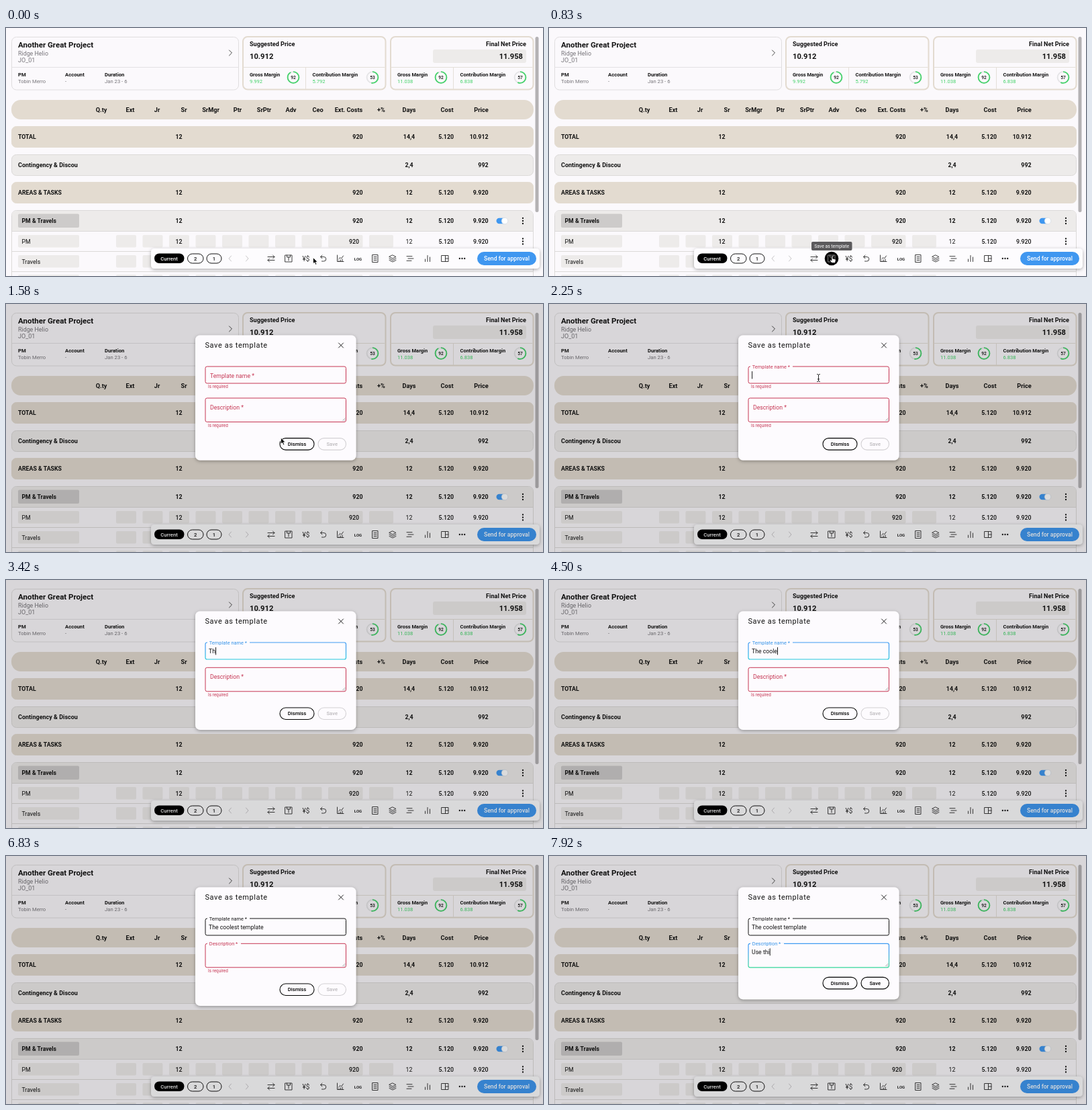
An HTML page for the animation above (8000 ms loop, 800x369 px).

```html
<!DOCTYPE html>
<html lang="en">
<head>
<meta charset="utf-8">
<title>Save as template</title>
<style>
html, body { margin: 0; width: 100%; height: 100%; overflow: hidden; background: #fbf9fc; }
svg { display: block; width: 100vw; height: 100vh; }
text { font-family: Roboto, "Open Sans", sans-serif; white-space: pre; }
</style>
</head>
<body>
<svg id="stage" viewBox="0 0 800 369"></svg>
<script>
const INK = '#131313', BG = '#fbf9fc', SAND = '#e3dbd0', PALE = '#edebea', GREEN = '#45d36b';
const RED = '#c63653', BLUE = '#3593e8', PANEL = '#fdfbfe';
const LOOP = 8000;

// Markup helpers; text is placed by its vertical centre.
const text = (x, y, s, size, weight = 400, fill = INK, anchor = 'start', more = '') =>
  `<text x="${x}" y="${y + size * 0.36}" font-size="${size}" font-weight="${weight}" fill="${fill}" text-anchor="${anchor}" ${more}>${s.replace('&', '&amp;')}</text>`;
const box = (x, y, w, h, r, fill, stroke = 'none', sw = 1, more = '') =>
  `<rect x="${x}" y="${y}" width="${w}" height="${h}" rx="${r}" fill="${fill}" stroke="${stroke}" stroke-width="${sw}" ${more}/>`;
const path = (d, stroke = INK, w = 1, more = '') =>
  `<path d="${d}" fill="none" stroke="${stroke}" stroke-width="${w}" stroke-linecap="round" stroke-linejoin="round" ${more}/>`;
const dots = (x, y, dx, dy) =>
  [-1, 0, 1].map(k => `<circle cx="${x + k * dx}" cy="${y + k * dy}" r="1.15" fill="${INK}"/>`).join('');

function donut(x, pct) {
  const len = 2 * Math.PI * 8.4;
  return `<g transform="translate(${x} 73.5)" fill="none" stroke-width="1.8">
    <circle r="8.4" stroke="#e4e4e6"/>
    <circle r="8.4" stroke="${GREEN}" stroke-dasharray="${len * pct / 100} ${len}" transform="rotate(-90)"/>
    </g>` + text(x, 73.7, '' + pct, 6.6, 500, INK, 'middle');
}

function priceCard(x, gross, grossPct, contrib, contribPct) {
  return box(x + 1, 13, 212.5, 78.5, 7, BG, SAND, 2) +
    path(`M${x + 2} 58.5H${x + 212}M${x + 94.5} 58.5V90.5`, '#e4dfd9') +
    text(x + 11, 69.3, 'Gross Margin', 7.5, 700) + text(x + 11, 79.5, gross, 7.6, 400, GREEN) +
    text(x + 104.5, 69.3, 'Contribution Margin', 7.5, 700) + text(x + 104.5, 79.5, contrib, 7.6, 400, GREEN) +
    donut(x + 76, grossPct) + donut(x + 194, contribPct);
}

function header() {
  let s = box(8.5, 13.5, 338, 78.5, 7, BG, '#e0dedf') + path('M9 58.5H346', '#e4e2e4') +
    text(18, 25.2, 'Another Great Project', 11.5, 700) +
    text(18, 37.3, 'Ridge Helio', 8.9, 400, '#77757a') + text(18, 48, 'JO_01', 9, 400, '#77757a') +
    path('M332.5 33L336.5 37L332.5 41', '#444');
  [[18, 'PM', 'Tobin Merro'], [88, 'Account', '-'], [147, 'Duration', 'Jan 23 - 6']].forEach(([x, a, b]) => {
    s += text(x, 69.5, a, 7.7, 700) + text(x, 79.5, b, 7.7, 400, '#77757a');
  });
  return s + priceCard(352, '9.992', 92, '5.792', 53) + priceCard(572, '11.038', 92, '6.838', 57) +
    text(363, 24, 'Suggested Price', 9.1, 700) + text(363, 42, '10.912', 11.2, 700) +
    text(775, 24, 'Final Net Price', 9.1, 700, INK, 'end') +
    box(636, 32, 139, 20, 3, PALE) + text(770, 42, '11.958', 11.2, 700, INK, 'end');
}

// Values in the order: senior days, external costs, days, cost, price.
function values(y, list, weight = 700, inset = 0) {
  const cols = [[262.5, 'end'], [531.5 - inset, 'end'], [600.5, 'middle'], [667, 'end'], [718.5, 'end']];
  return list.map((v, i) => v && text(cols[i][0], y, v, 8.8, i == 2 ? weight : Math.max(weight, 500), INK, cols[i][1])).join('');
}

function fieldsRow(y) {
  let s = box(18, y, 91, 18.5, 2, PALE);
  for (let i = 0; i < 8; i++) s += box(164 + i * 39.5, y, 30, 18.5, 2, PALE);
  return s + box(480, y, 51.5, 18.5, 2, PALE) + box(541, y, 36, 18.5, 2, PALE);
}

function table() {
  let s = box(8, 107, 778, 29, 14, SAND);
  const heads = [['Q.ty', 142], ['Ext', 185], ['Jr', 225], ['Sr', 265], ['SrMgr', 305], ['Ptr', 345], ['SrPtr', 384.5],
    ['Adv', 424.5], ['Ceo', 464.5], ['Ext. Costs', 510.5], ['+%', 559], ['Days', 600.5], ['Cost', 657], ['Price', 708]];
  heads.forEach(([h, x]) => { s += text(x, 121.5, h, 9.2, 700, INK, 'middle'); });
  const bands = [[146, 'TOTAL', SAND, ['12', '920', '14,4', '5.120', '10.912']],
    [188, 'Contingency & Discou', PALE, ['', '', '2,4', '', '992']],
    [229, 'AREAS & TASKS', SAND, ['12', '920', '12', '5.120', '9.920']]];
  bands.forEach(([y, name, fill, vals]) => {
    s += box(8.5, y + 0.5, 777, 31, 7, fill, fill == PALE ? '#dcdad9' : fill) +
      text(18, y + 15.5, name, fill == PALE ? 9 : 8.8, 700) + values(y + 15.5, vals);
  });
  s += box(8.5, 271.5, 777, 130, 7, BG, '#dcdad9') +
    `<path d="M9 302V278.500Q9 272 16 272H778Q785 272 785 278.500V302Z" fill="${PALE}"/>` +
    path('M9 302.500H785M9 332.500H785M9 362.500H785', '#dcdad9') +
    box(18, 276.5, 91, 20.5, 2, '#cdcbca') + text(23.5, 287, 'PM & Travels', 8.7, 700) +
    values(287, ['12', '920', '12', '5.120', '9.920']) +
    box(730.5, 282.8, 16.5, 8.4, 4.2, '#3f97f0') + '<circle cx="743" cy="287" r="4.800" fill="#fff" stroke="#cbd3dd" stroke-width=".6"/>' +
    dots(770, 287, 0, 4) + dots(770, 317.5, 0, 4);
  [308, 338, 367].forEach(y => { s += fieldsRow(y); });
  return s + text(23.5, 317.5, 'PM', 8.7) + text(23.5, 347.5, 'Travels', 8.7) +
    values(317.5, ['12', '920', '12', '5.120', '9.920'], 400, 5.5) +
    box(788.5, 13, 5, 261, 2.5, '#b4b2b4');
}

const TEMPLATE_ICON = 'M-5-5H5V5H-5ZM-2.500-5V-2H2.500V-5M0-2V3';

function toolbar() {
  const icons = [
    [334, 'M1.500-4L-2 0L1.500 4', '#c4c2c5'], [359, 'M-1.500-4L2 0L-1.500 4', '#c4c2c5'],
    [395, 'M-5-2.500H5M2.500-5L5-2.500L2.500 0M5 2.500H-5M-2.500 0L-5 2.500L-2.500 5'],
    [472.5, 'M-3.500-2.500H1A3.200 3.200 0 0 1 1 4H-2M-1.500-5L-4-2.500L-1.500 0'],
    [498, 'M-4.500-5V4.500H5M-2.500 1L0-1.500L1.500 0L4.500-4M-2 4V3M.5 4V2M3 4V1'],
    [550, 'M-4-5.500H4V5.500H-4ZM-2-2.500H2M-2 0H2M-2 2.500H2'],
    [576, 'M0-5L5-2.500L0 0L-5-2.500ZM-5 0L0 2.500L5 0M-5 2.500L0 5L5 2.500'],
    [602, 'M-5-3.300H3M-3 0H5M-5 3.300H2'],
    [628, 'M-3.500 4.500V1M0 4.500V-4.500M3.500 4.500V-2'],
    [654, 'M-5-4.500H5V4.500H-5ZM.5-4.500V4.500M.5 0H5']];
  let s = box(216, 328, 579, 30, 5, '#fdfcfe', 'none', 1, 'filter="url(#soft)"') +
    box(221, 335.5, 44.5, 14.5, 7.2, '#000') + text(243, 342.8, 'Current', 7.7, 500, '#fff', 'middle') +
    box(270.5, 336, 23.5, 14, 7, 'none', INK) + text(282.2, 343, '2', 7.7, 500, INK, 'middle') +
    box(299, 336, 22, 14, 7, 'none', INK) + text(310, 343, '1', 7.7, 500, INK, 'middle');
  icons.forEach(([x, d, c = '#333']) => { s += path(d, c, 0.95, `transform="translate(${x} 343)"`); });
  return s + `<circle id="hover" cx="421" cy="343" r="10.300" fill="#000"/>` +
    path(TEMPLATE_ICON, '#333', 0.95, 'id="tplIcon" transform="translate(421 343)"') +
    text(447, 343.2, '¥$', 10, 400, '#333', 'middle') + text(524.5, 343.4, 'LOG', 6, 700, '#222', 'middle') +
    dots(679.5, 343, 3.7, 0) +
    box(702, 333, 88, 20, 10, '#3f97f0') + text(746, 343, 'Send for approval', 8.65, 500, '#fff', 'middle');
}

const field = (id, h, label) => `<g id="${id}">` +
  box(297, 0, 209.5, h, 2.5, PANEL, RED, 1, `id="${id}Box"`) +
  `<rect id="${id}Notch" x="300" y="-1" height="2" fill="${PANEL}"/>` +
  text(304, 0, label, 8.7, 400, RED, 'start', `id="${id}Label"`) +
  text(302, h < 30 ? 12.6 : 12.3, '', 8.7, 400, INK, 'start', `id="${id}Text"`) +
  path(h < 30 ? 'M0 7.500V18' : 'M0 7.500V17.500', '#000', 0.9, `id="${id}Caret"`) +
  (h > 30 ? path(`M501.500 ${h - 2}L505 ${h - 5.500}M503.500 ${h - 1.800}L505 ${h - 3.200}`, '#777', 0.6) : '') +
  text(301, h + 4.9, 'Is required', 6.35, 400, RED, 'start', `id="${id}Err"`) + '</g>';

const button = (x, w, label, id) => `<g id="${id}" stroke="#000">` + box(x, -8.7, w, 17.5, 8.7, PANEL, 'inherit', 1.1) +
  text(x + w / 2, 0, label, 7.7, 500, 'currentColor', 'middle', 'stroke="none"') + '</g>';

const gradient = (id, end) => `<linearGradient id="${id}" x2="0" y2="1"><stop offset=".3" stop-color="#3f9cf2"/><stop offset="1" stop-color="${end}"/></linearGradient>`;

document.getElementById('stage').innerHTML = `<defs>
  <filter id="soft" x="-10%" y="-30%" width="120%" height="180%"><feDropShadow dx="0" dy="1.500" stdDeviation="2.500" flood-opacity=".32"/></filter>
  ${gradient('nameGrad', '#25c8de')}${gradient('descGrad', '#35d69a')}</defs>
  <rect width="800" height="369" fill="${BG}"/>` + header() + table() + toolbar() +
  `<g id="dialog"><rect width="800" height="369" fill="#000" opacity=".14"/>` +
  box(282, 46.5, 239.5, 186, 7, PANEL, 'none', 1, 'id="panel" filter="url(#soft)"') +
  text(296.5, 61.3, 'Save as template', 11, 400, INK, 'start', 'letter-spacing=".58"') +
  path('M495.500 58L502.500 65M502.500 58L495.500 65', '#222') +
  field('name', 25, 'Template name *') + field('desc', 35.5, 'Description *') +
  `<g id="actions">` + button(408, 51, 'Dismiss', 'dismiss') + button(465, 41.5, 'Save', 'save') + '</g></g>' +
  `<g id="tip">` + box(391, 318, 60.5, 13, 2, '#5b5a5c') + text(421.2, 324.5, 'Save as template', 6.8, 400, '#fff', 'middle') + '</g>' +
  `<g id="cursor"><path id="arrow" d="M0 0V9.300L2.200 7.300L3.700 10.800L5.300 10.100L3.900 6.700H6.700Z" fill="#000" stroke="#fff" stroke-width=".8"/>
  <path id="hand" d="M-1 .6C-1-.6 .9-.6 .9 .6V4L4.500 5Q5.600 5.400 5.200 7L4.400 10.500H-.8L-3.700 6.800Q-3.600 5.400-2.200 6L-1 7Z" fill="#fff" stroke="#000" stroke-width=".8"/>` +
  path('M-2-5.500Q0-5.500 0-4.500V4.500Q0 5.500-2 5.500M2-5.500Q0-5.500 0-4.500M2 5.500Q0 5.500 0 4.500M-1.200 1.800H1.200', '#111', 0.9, 'id="beam"') + '</g>';

const $ = Object.fromEntries([...document.querySelectorAll('[id]')].map(e => [e.id, e]));
const show = (el, on) => el.setAttribute('display', on ? 'inline' : 'none');
const set = (el, attrs) => { for (const k in attrs) el.setAttribute(k, attrs[k]); };
const clamp = v => Math.max(0, Math.min(1, v));
const ease = v => { v = clamp(v); return v * v * (3 - 2 * v); };
const mix = (a, b, k) => a + (b - a) * k;

const OPEN = 910, KEY = 144;
const inputs = {
  name: { focus: 2000, blur: 6300, start: 3270, copy: 'The coolest template', rest: 13.8, notch: 63 },
  desc: { focus: 6300, blur: LOOP, start: 7050, copy: 'Use this', rest: 14, notch: 50 }
};

function drawField(id, t, y) {
  const f = inputs[id], focused = t >= f.focus && t < f.blur;
  const count = t < f.start ? 0 : Math.min(f.copy.length, 1 + Math.floor((t - f.start) / KEY));
  const k = ease((t - f.focus) / 150), size = mix(8.7, 7.4, k);
  const valid = count > 0, tone = !valid ? RED : focused ? BLUE : INK;
  set($[id], { transform: `translate(0 ${y})` });
  set($[id + 'Box'], { stroke: valid && focused ? `url(#${id}Grad)` : tone, 'stroke-width': valid && focused ? 1.2 : 1 });
  set($[id + 'Notch'], { width: f.notch * k });
  set($[id + 'Label'], { x: mix(304, 302.8, k), y: mix(f.rest, 0.3, k) + size * 0.36, 'font-size': size, fill: tone });
  $[id + 'Text'].textContent = f.copy.slice(0, count);
  show($[id + 'Err'], !valid);

  // The caret stays lit while typing, then blinks.
  const last = count ? f.start + (count - 1) * KEY : f.focus;
  show($[id + 'Caret'], focused && (t - last) % 1000 < 500);
  set($[id + 'Caret'], { transform: `translate(${302.6 + (count ? $[id + 'Text'].getComputedTextLength() : 0)} 0)` });
  return valid;
}

function drawCursor(t) {
  const a = ease((t - 80) / 440), b = ease((t - 1150) / 750);
  const x = mix(mix(457.5, 422, a), 401.5, b), y = mix(mix(341.5, 339, a), 110, b);
  const over = x < 432 && y > 331;
  const inField = t > OPEN && ((y > 92 && y < 118) || (y > 140 && y < 175));
  set($.cursor, { transform: `translate(${x} ${y})` });
  show($.cursor, t < inputs.name.start);
  show($.hand, over);
  show($.beam, inField);
  show($.arrow, !over && !inField);
  show($.hover, over);
  set($.tplIcon, { stroke: over ? '#8a8a8a' : '#333' });
  show($.tip, t > 440 && t < 1300);
}

function draw(t) {
  show($.dialog, t >= OPEN);
  const nameOk = drawField('name', t, 93);
  const descOk = drawField('desc', t, nameOk ? 130.3 : 140);
  const lift = 9.6 * (nameOk + descOk);
  set($.panel, { height: 186 - lift });
  set($.actions, { transform: `translate(0 ${208.3 - lift})` });
  const ready = nameOk && descOk;
  set($.save, { stroke: ready ? '#000' : '#d3d1d4', color: ready ? '#000' : '#bbb9bc' });
  drawCursor(t);
}

function tick() {
  draw(performance.now() % LOOP);
  requestAnimationFrame(tick);
}
tick();
</script>
</body>
</html>
```
